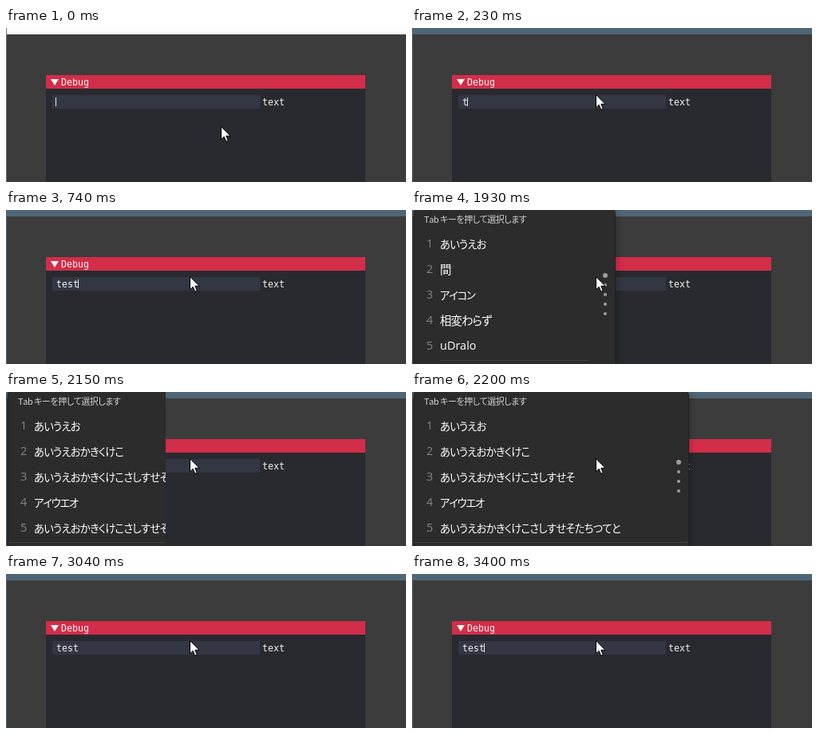
These frames come from a looping animation (501x193 px, 3.65 s). An HTML page:

```html
<!DOCTYPE html>
<html lang="ja">
<head>
<meta charset="utf-8">
<title>Text input</title>
<style>
  html, body { margin: 0; width: 100%; height: 100%; overflow: hidden; }
  .stage { position: relative; width: 501px; height: 193px; overflow: hidden; background: #3c3c3c; }
  .stage * { position: absolute; box-sizing: border-box; }
  .stage, .stage * { animation: 3650ms step-end infinite; }

  .top { left: 0; top: 0; width: 501px; height: 8px; animation-name: frame; }
  .edge { left: 0; top: 0; width: 1px; height: 193px; animation-name: edge; }

  .window { left: 50px; top: 59px; width: 400px; height: 134px; background: #292a2f;
    color: #f4f4f4; font: 11.63px/13px "DejaVu Sans Mono", monospace; white-space: pre; }
  .header { left: 0; top: 0; width: 400px; height: 17px; background: #d22d49; }
  .arrow { left: 6px; top: 5px; border: solid transparent; border-width: 8px 5px 0; border-top-color: #f4f4f4; }
  .title { left: 19px; top: 3px; }
  .field { left: 8px; top: 25px; width: 260px; height: 17px; background: #333743; }
  .typed { left: 5px; top: 3px; height: 14px; overflow: hidden; animation-name: type; }
  .caret { left: 4px; top: 3px; width: 1px; height: 11px; background: #e8e8e8; animation-name: caret; }
  .label { left: 271px; top: 28px; }

  .popup { left: 2px; top: -3px; height: 210px; border-radius: 8px;
    background: #2c2c2c; color: #fff; white-space: pre; visibility: hidden;
    box-shadow: inset 0 0 0 1px #202020, 0 0 10px #0005;
    font: 13.4px/32px "Noto Sans CJK JP", "Noto Sans CJK", sans-serif;
    font-feature-settings: "palt"; font-kerning: none; letter-spacing: -.8px; }
  .first { width: 253px; animation-name: first; }
  .second { width: 345px; animation-name: second; }
  .hint { left: 13px; top: -2px; font-size: 11px; letter-spacing: -.45px; color: #d2d2d2; }
  .row { left: 33px; top: calc(28.5px + 32px * var(--i)); height: 32px; }
  .row::before { content: attr(data-n); position: absolute; left: -17px; top: .5px;
    color: #858585; font: 14.5px/32px "Open Sans", sans-serif; }
  .kata { letter-spacing: -1.3px; }
  .kanji { font-size: 14.5px; letter-spacing: -1px; }
  .latin { font: 14.5px/32px "Open Sans", sans-serif; letter-spacing: 0; }
  .rule { top: 191px; height: 1px; background: #424242; }
  .first .rule { left: 33px; width: 186px; }
  .second .rule { left: 0; width: 344px; }
  .dots { left: 0; top: 3px; fill: #9d9d9d; }

  .pointer { left: 0; top: 0; animation-name: point; }

  @keyframes frame { 0% { background: #fcfcfc } 1.3698%, to { background: #4f6676 } }
  @keyframes edge { 0% { background: #707070 } 1.3698%, to { background: #4f6676 } }
  @keyframes point {
    0% { transform: translate(269px, 123px) }
    1.3698%, to { transform: translate(230px, 83px) }
  }
  @keyframes type {
    0% { width: 0 }
    6.3013% { width: 7px }
    7.6712% { width: 14px }
    15.3424% { width: 21px }
    20.2739%, to { width: 28px }
  }
  @keyframes caret {
    0% { transform: none; opacity: 1 }
    6.3013% { transform: translateX(7px); opacity: 1 }
    7.6712% { transform: translateX(14px); opacity: 1 }
    15.3424% { transform: translateX(21px); opacity: 1 }
    20.2739% { transform: translateX(28px); opacity: 1 }
    83.2876% { transform: translateX(28px); opacity: 0 }
    93.1506%, to { transform: translateX(28px); opacity: 1 }
  }
  @keyframes first {
    0% { visibility: hidden }
    52.8767% { visibility: visible }
    58.9041%, to { visibility: hidden }
  }
  /* The wider list is first cut off at x = 200, then shown whole. */
  @keyframes second {
    0% { visibility: hidden; clip-path: none }
    58.9041% { visibility: visible; clip-path: inset(0 147px 0 -10px) }
    60.2739% { visibility: visible; clip-path: none }
    83.2876%, to { visibility: hidden; clip-path: none }
  }
</style>
</head>
<body>
<div class="stage">
  <div class="top"></div>
  <div class="edge"></div>

  <div class="window">
    <div class="header"><i class="arrow"></i><span class="title">Debug</span></div>
    <div class="field"><span class="typed">test</span><i class="caret"></i></div>
    <span class="label">text</span>
  </div>

  <div class="popup first">
    <span class="hint">Tab キーを押して選択します</span>
    <span class="row" data-n="1" style="--i:0">あいうえお</span>
    <span class="row kanji" data-n="2" style="--i:1">間</span>
    <span class="row kata" data-n="3" style="--i:2">アイコン</span>
    <span class="row kanji" data-n="4" style="--i:3">相変わらず</span>
    <span class="row latin" data-n="5" style="--i:4">uDralo</span>
    <i class="rule"></i>
    <svg class="dots" width="252" height="193">
      <circle cx="240" cy="82" r="3"/><circle cx="240" cy="94" r="2"/><circle cx="240" cy="106" r="2"/>
      <circle cx="240" cy="118" r="2"/><circle cx="240" cy="130" r="2"/>
    </svg>
  </div>

  <div class="popup second">
    <span class="hint">Tab キーを押して選択します</span>
    <span class="row" data-n="1" style="--i:0">あいうえお</span>
    <span class="row" data-n="2" style="--i:1">あいうえおかきくけこ</span>
    <span class="row" data-n="3" style="--i:2">あいうえおかきくけこさしすせそ</span>
    <span class="row kata" data-n="4" style="--i:3">アイウエオ</span>
    <span class="row" data-n="5" style="--i:4">あいうえおかきくけこさしすせそたちつてと</span>
    <i class="rule"></i>
    <svg class="dots" width="344" height="193">
      <circle cx="332" cy="88" r="3"/><circle cx="332" cy="100" r="2"/>
      <circle cx="332" cy="112" r="2"/><circle cx="332" cy="124" r="2"/>
    </svg>
  </div>

  <svg class="pointer" width="14" height="21">
    <path d="M.5.7V16.8L4.2 13.3 6.7 19.3 9.3 18.2 6.8 12.3H12Z" fill="#fff" stroke="#000"/>
  </svg>
</div>
</body>
</html>
```
